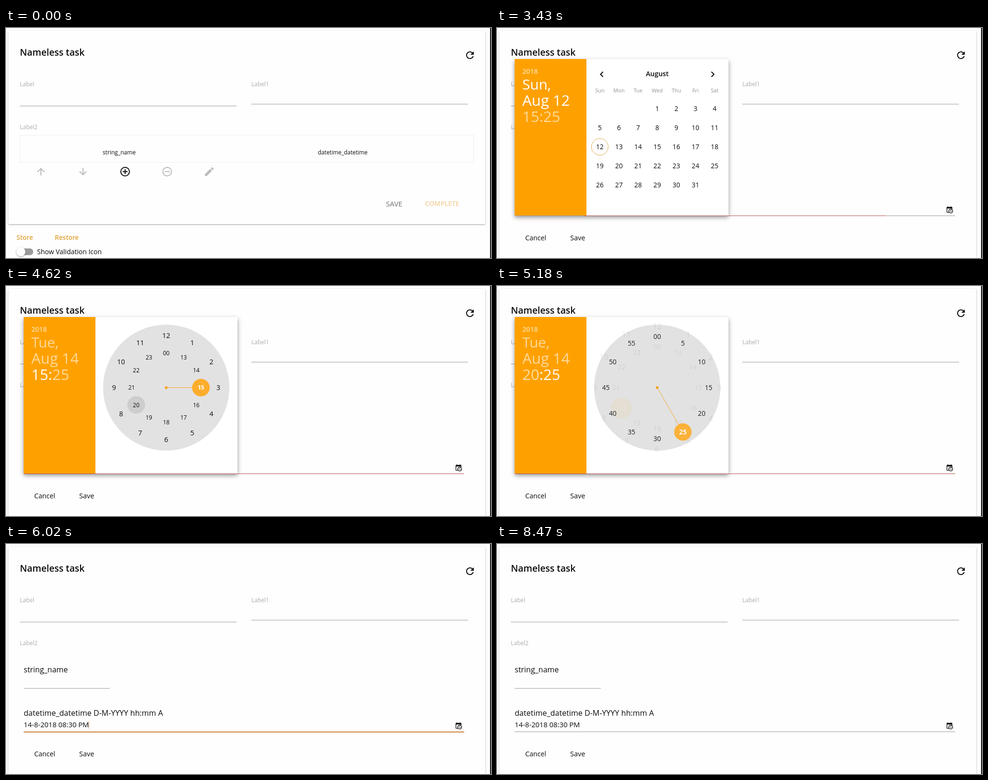
Recreate the animation shown at these times as an HTML page with a canvas. Size 1014x482 px, loop 8.82 s.

```html
<!DOCTYPE html>
<html lang="en">
<head>
<meta charset="utf-8">
<title>Date and time form</title>
<style>
html, body { margin: 0; width: 100%; height: 100%; overflow: hidden; background: #fefefe; }
canvas { display: block; }
</style>
</head>
<body>
<canvas id="stage" width="1014" height="482"></canvas>
<script>
const ctx = document.getElementById('stage').getContext('2d');
const LOOP = 8820, ORANGE = '#fea100', INK = '#0c0c0c', MUTED = '#bababa', RULE = '#9c9c9c';
const CLOCK = { x: 335, y: 213 };

// Moments of the interaction, in ms
const AT = {
  hoverAdd: 1260, pressAdd: 2450, edit: 2520, open: 3430, hoverDay: 3640, pickDay: 3850,
  clock: 3990, hoverHour: 4620, pickHour: 4760, minutes: 5000, hoverMinute: 5670,
  pickMinute: 5810, close: 5880, closed: 6000, blur: 8050
};

const ICONS = {
  refresh: 'M17.65 6.35C16.2 4.9 14.21 4 12 4c-4.42 0-7.99 3.58-7.99 8s3.57 8 7.99 8c3.73 0 6.84-2.55 7.73-6h-2.08c-.82 2.33-3.04 4-5.65 4-3.31 0-6-2.69-6-6s2.69-6 6-6c1.66 0 3.14.69 4.22 1.78L13 11h7V4z',
  up: 'M4 12l1.41 1.41L11 7.83V20h2V7.83l5.58 5.59L20 12l-8-8z',
  down: 'M20 12l-1.41-1.41L13 16.17V4h-2v12.17l-5.58-5.59L4 12l8 8z',
  edit: 'M3 17.25V21h3.75L17.81 9.94l-3.75-3.75zM20.71 7.04c.39-.39.39-1.02 0-1.41l-2.34-2.34c-.39-.39-1.02-.39-1.41 0l-1.83 1.83 3.75 3.75z',
  left: 'M15.41 7.41L14 6l-6 6 6 6 1.41-1.41L10.83 12z',
  right: 'M10 6L8.59 7.41 13.17 12l-4.58 4.58L10 18l6-6z',
  schedule: 'M15 13h1.5v2.82l2.44 1.41-.75 1.3L15 16.69zM19 8H5v11h4.67A7 7 0 0 1 19 9.67zM5 21a2 2 0 0 1-2-2V5a2 2 0 0 1 2-2h1V1h2v2h8V1h2v2h1a2 2 0 0 1 2 2v6.1A7 7 0 1 1 11.1 21zM16 11.15a4.85 4.85 0 1 0 0 9.7a4.85 4.85 0 0 0 0-9.7z'
};

const clamp = v => Math.min(1, Math.max(0, v));
const ease = (t, start, duration) => 1 - (1 - clamp((t - start) / duration)) ** 3.5;
const pad = n => String(n).padStart(2, '0');

function text(str, x, y, size, color = INK, { weight = 400, align = 'left' } = {}) {
  ctx.font = `${weight} ${size}px "Open Sans", sans-serif`;
  ctx.fillStyle = color;
  ctx.textAlign = align;
  ctx.fillText(str, x, y);
  return ctx.measureText(str).width;
}
const centered = (str, x, y, size, color, weight) =>
  text(str, x, y + size * .357, size, color, { weight, align: 'center' });

function rect(x, y, w, h, color) {
  ctx.fillStyle = color;
  ctx.fillRect(x, y, w, h);
}

function roundRect(x, y, w, h, r, color) {
  ctx.fillStyle = color;
  ctx.beginPath();
  ctx.roundRect(x, y, w, h, r);
  ctx.fill();
}

function disc(x, y, r, color) {
  ctx.fillStyle = color;
  ctx.beginPath();
  ctx.arc(x, y, r, 0, 7);
  ctx.fill();
}

function ring(x, y, r, color, width) {
  ctx.strokeStyle = color;
  ctx.lineWidth = width;
  ctx.beginPath();
  ctx.arc(x, y, r, 0, 7);
  ctx.stroke();
}

function icon(name, x, y, color = INK, size = 24) {
  ctx.save();
  ctx.translate(x - size / 2, y - size / 2);
  ctx.scale(size / 24, size / 24);
  ctx.fillStyle = color;
  ctx.fill(new Path2D(ICONS[name]), 'evenodd');
  ctx.restore();
}

function withShadow(blur, dy, alpha, draw) {
  ctx.save();
  ctx.shadowColor = `rgba(0,0,0,${alpha})`;
  ctx.shadowBlur = blur;
  ctx.shadowOffsetY = dy;
  draw();
  ctx.restore();
}

function drawCard(bottom) {
  rect(0, 0, 1014, 482, '#fefefe');
  const sheet = () => roundRect(5, 6, 997, bottom - 6, 2, '#fefefe');
  withShadow(5, 1, .14, sheet);
  withShadow(2, 1, .28, sheet);
  rect(1012, 0, 2, 482, '#17171a');
  text('Nameless task', 29, 58, 19.3, INK, { weight: 600 });
  icon('refresh', 970, 57);
  text('Label', 29, 122, 12, '#acacac');
  text('Label1', 513, 122, 12, '#acacac');
  text('Label2', 29, 212, 12, '#acacac');
  rect(29, 163, 453, 1, RULE);
  rect(513, 159, 453, 1, RULE);
}

function drawList(t) {
  drawCard(411);
  ctx.strokeStyle = '#eee';
  ctx.lineWidth = 1;
  ctx.strokeRect(29.5, 224.5, 948, 57);
  text('string_name', 202, 265, 12);
  text('datetime_datetime', 652, 265, 11.8);

  if (t >= AT.hoverAdd) {
    ctx.save();
    ctx.beginPath();
    ctx.roundRect(205, 282, 88, 36, 2);
    ctx.clip();
    rect(205, 282, 88, 36, '#e1e1e1');
    if (t >= AT.pressAdd) disc(255, 301, 26, '#cacaca');
    ctx.restore();
  }
  icon('up', 73, 301, MUTED);
  icon('down', 161, 301, MUTED);
  ring(249, 301, 9, INK, 2);
  rect(244, 300, 10, 2, INK);
  rect(248, 296, 2, 10, INK);
  ring(337, 301, 9, MUTED, 2);
  rect(332, 300, 10, 2, MUTED);
  icon('edit', 425, 301, MUTED);

  centered('SAVE', 811.5, 368.5, 15, '#707070');
  centered('COMPLETE', 912, 368.5, 13.9, '#f3d29f', 600);
  text('Store', 22, 444, 13.6, '#e0a33a', { weight: 600 });
  text('Restore', 102, 444, 13.6, '#e0a33a', { weight: 600 });
  roundRect(23, 462, 34, 14, 7, '#9b9b9b');
  withShadow(3, 1, .4, () => disc(31, 469, 9.5, '#fff'));
  text('Show Validation Icon', 65, 474, 14);
}

function drawEditor(t) {
  drawCard(500);
  text('string_name', 37, 269, 16);
  rect(37, 302, 180, 1, RULE);
  text('datetime_datetime D-M-YYYY hh:mm A', 37, 360, 16.1);
  icon('schedule', 946, 381, INK, 16);
  text('Cancel', 59, 445, 14.2);
  text('Save', 153, 445, 14.5);
  if (t >= AT.pickMinute) text('14-8-2018 08:30 PM', 37, 384, 14.8);
  if ((t >= AT.close && t < 6580) || (t >= 7070 && t < 7630)) rect(173, 371, 1, 16, '#dfa375');

  if (t >= AT.open && t < AT.closed) drawPicker(t);

  rect(37, 393, 921, 1, RULE);
  if (t >= AT.open && t < AT.close) {
    const width = 921 * ease(t, 3347, 300);
    rect(497.5 - width / 2, 393, width, 1, '#b9544c');
  } else if (t >= AT.close && t < AT.blur) {
    rect(37, 393, 921, 2, '#d0813c');
  }
}

function drawPicker(t) {
  ctx.save();
  ctx.globalAlpha = 1 - clamp((t - AT.close) / 120);
  withShadow(9, 4, .42, () => rect(37, 65, 447, 328, '#fff'));
  rect(37, 65, 150, 328, ORANGE);
  drawHeader(t);
  if (t < AT.clock) drawCalendar(t);
  else drawClock(t);
  ctx.restore();
}

function drawHeader(t) {
  const dim = .6, swap = ease(t, AT.clock, 350), next = ease(t, AT.minutes, 350);
  const white = a => `rgba(255,255,255,${a})`;
  const fade = p => white(dim + (1 - dim) * p);
  const picked = t >= AT.pickDay;
  text('2018', 53, 96, 14.2, white(dim + .05), { weight: 600 });
  text(picked ? 'Tue,' : 'Sun,', 53, 129, 29.6, fade(1 - swap));
  text(picked ? 'Aug 14' : 'Aug 12', 53, 163, 31, fade(1 - swap));
  let x = 53;
  x += text(t < AT.pickHour ? '15' : '20', x, 197, 31, fade(swap * (1 - next)));
  x += text(':', x, 197, 31, fade(swap));
  text(t < AT.pickMinute ? '25' : '30', x, 197, 31, fade(next));
}

function drawCalendar(t) {
  icon('left', 219, 97);
  icon('right', 451, 97);
  centered('August', 335, 95.5, 14.1, INK, 600);
  ['Sun', 'Mon', 'Tue', 'Wed', 'Thu', 'Fri', 'Sat'].forEach((name, i) =>
    centered(name, 215 + i * 40, 131.5, 11, '#909090'));
  ring(215, 249, 17.5, '#dfa650', 1);
  const picked = t >= AT.pickDay;
  if (picked) disc(295, 249, 18, ORANGE);
  else if (t >= AT.hoverDay) disc(295, 249, 18, '#e6e6e6');
  for (let day = 1; day <= 31; day++) {
    const cell = day + 2;
    centered(String(day), 215 + cell % 7 * 40, 169.5 + Math.floor(cell / 7) * 40, 13.8,
      picked && day === 14 ? '#fff' : INK);
  }
}

// Twelve numbers on a circle around the clock centre
function dial(radius, size, label, selected, hovered) {
  for (let i = 0; i < 12; i++) {
    const a = i * Math.PI / 6, x = radius * Math.sin(a), y = -radius * Math.cos(a);
    const str = label(i), on = str === selected;
    if (on) disc(x, y, 18.5, '#fdad2c');
    else if (str === hovered) disc(x, y, 18.5, '#cdcdcd');
    centered(str, x, y, size, on ? '#fff' : INK, on ? 700 : 400);
  }
}

function hand(step, length) {
  const a = step * Math.PI / 6;
  ctx.strokeStyle = '#f5a62b';
  ctx.lineWidth = 1;
  ctx.beginPath();
  ctx.moveTo(0, 0);
  ctx.lineTo(length * Math.sin(a), -length * Math.cos(a));
  ctx.stroke();
}

function layer(alpha, scale, draw) {
  if (alpha <= 0) return;
  ctx.save();
  ctx.globalAlpha *= alpha;
  ctx.scale(scale, scale);
  draw();
  ctx.restore();
}

function drawClock(t) {
  const p = ease(t, AT.minutes, 350);
  const hour = t < AT.pickHour ? '15' : '20';
  const minute = t < AT.pickMinute ? '25' : '30';
  const hoveredHour = t < AT.hoverHour ? '19' : '20';
  ctx.save();
  ctx.translate(CLOCK.x, CLOCK.y);
  disc(0, 0, 132, '#e2e2e2');
  if (t < AT.minutes) hand(hour - 12, 54);
  else hand(minute / 5, 90);
  disc(0, 0, 3, '#f5a62b');
  layer(1 - p, 1 + .2 * p, () => {
    dial(109, 14.5, i => String(i || 12));
    dial(72.5, 12, i => i ? String(i + 12) : '00', hour, hoveredHour);
  });
  layer(p, .8 + .2 * p, () =>
    dial(109, 14, i => i === 1 ? '5' : pad(i * 5), minute, t >= AT.hoverMinute ? '30' : ''));
  ctx.restore();
}

function frame(now) {
  const t = now % LOOP;
  if (t < AT.edit) drawList(t);
  else drawEditor(t);
  requestAnimationFrame(() => frame(performance.now() - start));
}

const start = performance.now();
frame(0);
</script>
</body>
</html>
```
